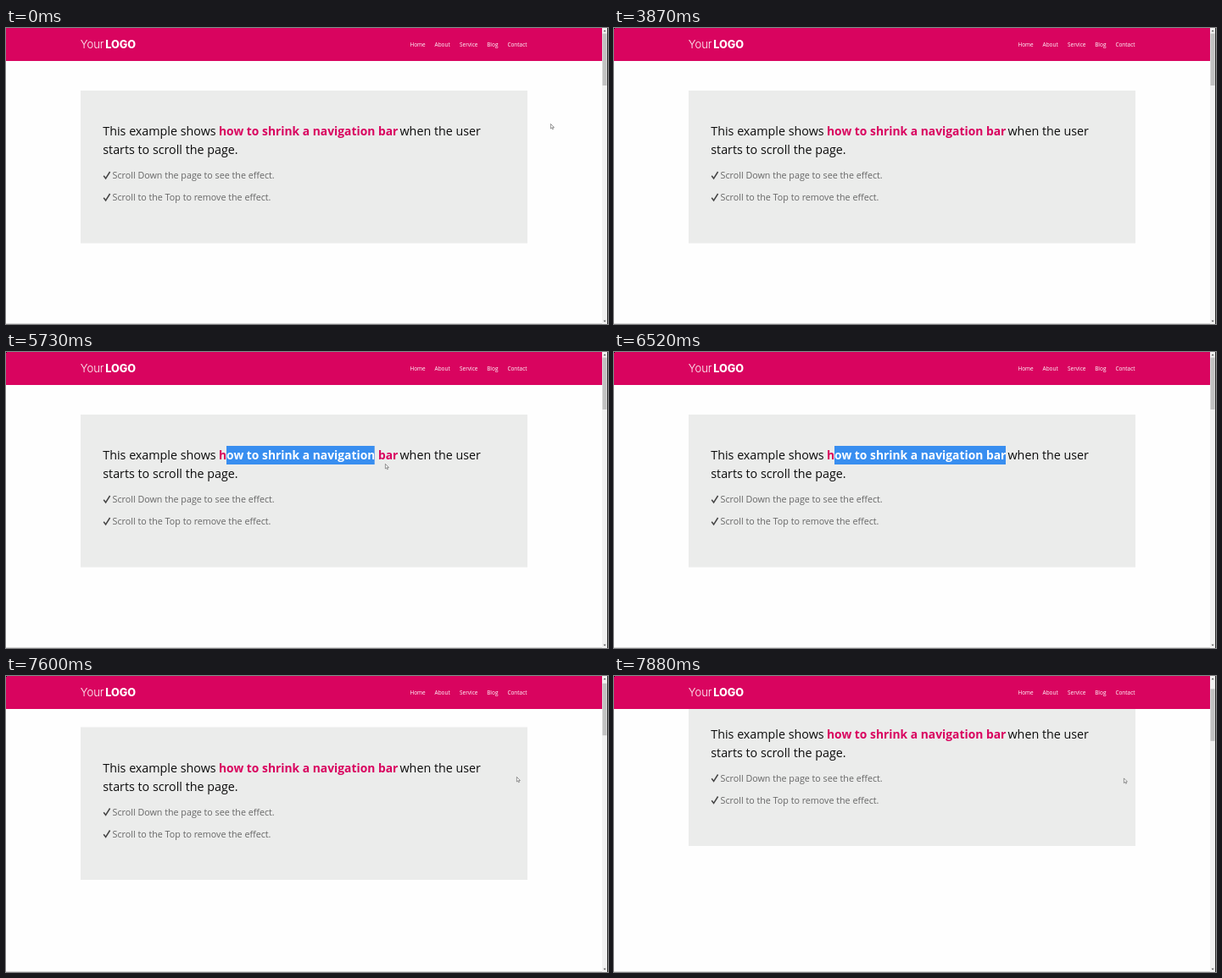
Animation, 710 px wide and 350 px high, one loop 8000 ms. Source, as an HTML page:

```html
<!DOCTYPE html>
<html lang="en">
<head>
<meta charset="utf-8">
<title>Shrinking navigation bar</title>
<style>
  html, body { margin: 0; width: 100%; height: 100%; overflow: hidden; background: #fefefe; }
  svg { display: block; width: 710px; height: 350px; font-family: "Open Sans", "Noto Sans", sans-serif; }
  .lead { font-size: 14.3px; fill: #0c0c0c; }
  .strong { font-size: 13.85px; font-weight: 700; fill: #d9045f; }
  .list { font-size: 10.73px; fill: #666; }
  .tick { fill: none; stroke: #444; stroke-width: 1.5; }
  .logo { font-family: Inter, "Open Sans", sans-serif; font-size: 13px; font-weight: 300; }
  .logo tspan { font-size: 12.7px; font-weight: 800; }
  .nav { font-size: 6.45px; font-weight: 500; }
</style>
</head>
<body>
<svg viewBox="0 0 710 350">
  <defs>
    <clipPath id="clip"><rect class="sel" x="260" y="111" height="22"/></clipPath>
  </defs>

  <g id="page">
    <rect x="88" y="74" width="527" height="180.5" fill="#ebeceb"/>
    <g class="lead">
      <text x="114.3" y="127.3">This example shows</text>
      <text x="464.5" y="127.3">when the user</text>
      <text x="114.3" y="149.3">starts to scroll the page.</text>
    </g>
    <text class="strong" x="251" y="127.3">how to shrink a navigation bar</text>
    <rect class="sel" x="260" y="111" height="22" fill="#388ef0"/>
    <g clip-path="url(#clip)">
      <text class="strong" x="251" y="127.3" style="fill:#fff">how to shrink a navigation bar</text>
    </g>
    <g class="list">
      <text x="125.6" y="178.2">Scroll Down the page to see the effect.</text>
      <text x="125.6" y="204.2">Scroll to the Top to remove the effect.</text>
    </g>
    <path class="tick" d="M115.2 174.8l2.4 3.2 5-8M115.2 200.8l2.4 3.2 5-8"/>
  </g>

  <rect width="703" height="39" fill="#d9045f"/>
  <g fill="#fff">
    <text class="logo" x="87.8" y="24">Your<tspan x="117.2">LOGO</tspan></text>
    <g class="nav">
      <text x="476.4" y="22.3">Home</text>
      <text x="505.6" y="22.3">About</text>
      <text x="535" y="22.3">Service</text>
      <text x="567.2" y="22.3">Blog</text>
      <text x="591.4" y="22.3">Contact</text>
    </g>
  </g>
  <rect id="corner" width="1" height="1" fill="#111"/>

  <rect y="349" width="703" height="1" fill="#d8d8d8"/>
  <rect x="703" width="6" height="350" fill="#f1f1f1"/>
  <rect id="thumb" x="703.5" y="6.5" width="5" height="61.5" fill="#c1c1c1"/>
  <path d="M704.6 4.2l1.5-2 1.5 2zM704.6 345.8l1.5 2 1.5-2z" fill="#555"/>
  <rect x="709" width="1" height="350" fill="#2a2a2a"/>

  <path id="cursor" d="M.4 .4V6l1.3-1.1 .9 1.9 .9-.4-.9-1.9h1.8z" fill="#fff" stroke="#555" stroke-width=".6"/>
</svg>
<script>
const LOOP = 8000, SEL_START = 260;
// time, cursor x, cursor y (x = 0 hides it), selection end, scroll offset
const steps = [
  [0, 642, 113, 0, 0],
  [100, 640, 103, 0, 0],
  [195, 635, 93, 0, 0],
  [290, 632, 86, 0, 0],
  [2270, 632, 85.5, 0, 0],
  [3110, 526, 108, 0, 0],
  [3250, 0, 0, 0, 0],
  [5250, 0, 0, 311, 0],
  [5420, 385, 132, 349, 0],
  [5570, 420, 132, 398, 0],
  [5730, 447, 132, 434.7, 0],
  [5890, 466, 132, 454, 0],
  [6050, 472.5, 132, 462, 0],
  [6210, 472, 132, 462, 0],
  [6520, 0, 0, 462, 0],
  [6800, 576, 119, 462, 0],
  [6940, 602, 119, 462, 0],
  [7080, 602, 119, 0, 0.5],
  [7600, 602, 119, 0, 13.5],
  [7730, 602, 119, 0, 36.5],
  [7880, 601, 120.5, 0, 53.5]
];
const $ = id => document.getElementById(id);
const move = (id, x, y) => $(id).setAttribute("transform", `translate(${x} ${y})`);
const show = (id, on) => $(id).setAttribute("visibility", on ? "visible" : "hidden");
const selection = document.querySelectorAll(".sel");

function draw(now) {
  const t = now % LOOP;
  const [, x, y, end, scroll] = steps.findLast(s => s[0] <= t);
  move("page", 0, -scroll);
  move("thumb", 0, scroll * 0.165);
  move("cursor", x, y);
  show("cursor", x > 0);
  show("corner", t >= 3870);
  selection.forEach(r => r.setAttribute("width", Math.max(0, end - SEL_START)));
}

const start = performance.now();
function loop() {
  draw(performance.now() - start);
  requestAnimationFrame(loop);
}
loop();
</script>
</body>
</html>
```
